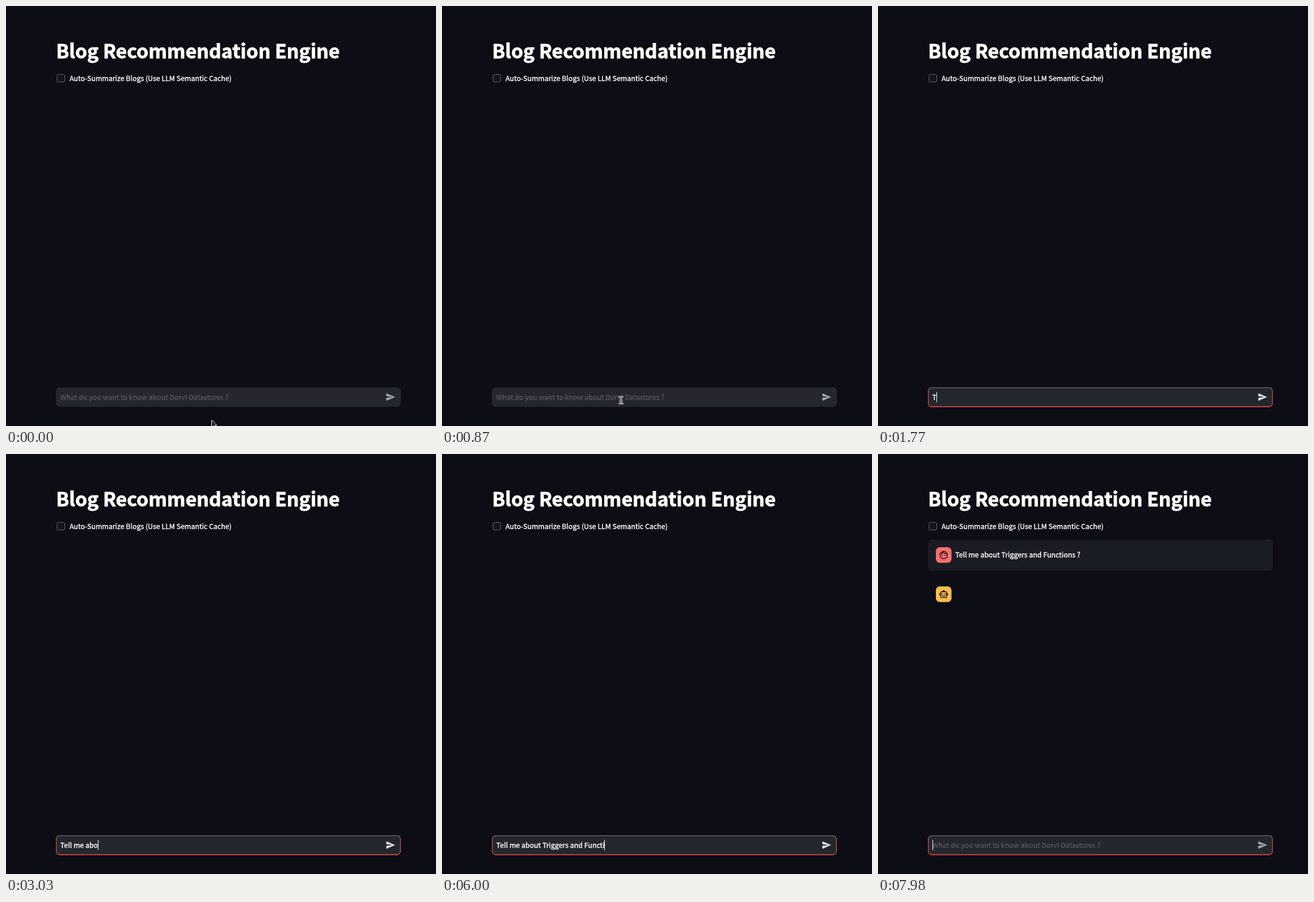
These frames come from a looping animation (758 by 739 pixels, 8 s). An HTML page:

```html
<!DOCTYPE html>
<html lang="en">
<head>
<meta charset="utf-8">
<title>Blog Recommendation Engine</title>
<style>
  html, body { margin: 0; width: 100%; height: 100%; overflow: hidden; background: #0c0d15; }
  svg { display: block; width: 100%; height: 100%; }
  text {
    font: 400 12.36px "Noto Sans CJK SC", "Noto Sans CJK JP", "Noto Sans", sans-serif;
    fill: #fafafa; stroke: #fafafa; stroke-width: .42px; white-space: pre;
  }
  #title { font-size: 33.85px; font-weight: 700; letter-spacing: 0; fill: #fff; stroke: #fff; stroke-width: .9px; }
  #hint { fill: #595b64; stroke: #595b64; stroke-width: .25px; }
</style>
</head>
<body>
<svg viewBox="0 0 758 739" xmlns="http://www.w3.org/2000/svg">
  <defs>
    <linearGradient id="ring" x1="0" y1="0" x2="0" y2="1">
      <stop offset="0" stop-color="#80757b"/>
      <stop offset=".05" stop-color="#80757b"/>
      <stop offset=".22" stop-color="#d94b47"/>
      <stop offset="1" stop-color="#e84c48"/>
    </linearGradient>
  </defs>
  <rect width="758" height="739" fill="#0c0d15"/>
  <rect y="737.5" width="758" height="1.5" fill="#07060c"/>

  <text id="title" x="88.2" y="92">Blog Recommendation Engine</text>
  <rect x="90" y="120.3" width="13.4" height="13.4" rx="2.5" fill="#12141b" stroke="#686a72"/>
  <text x="112" y="132">Auto-Summarize Blogs (Use LLM Semantic Cache)</text>

  <g id="question">
    <rect x="88" y="150.5" width="608" height="55" rx="7" fill="#1a1c23"/>
    <rect x="102" y="164" width="27.6" height="27.6" rx="7" fill="#fc6e6b"/>
    <g transform="translate(107.2 169.2) scale(.72)" fill="none" stroke="#14131a" stroke-width="2">
      <circle cx="12" cy="12" r="9"/>
      <path d="M3.5 11Q8.5 9 10.3 4Q13.5 9 20.4 9"/>
      <g fill="#14131a" stroke="none">
        <circle cx="9" cy="13" r="1.3"/><circle cx="15" cy="13" r="1.3"/>
      </g>
    </g>
    <text id="asked" x="136.3" y="182"></text>
  </g>

  <g id="answer">
    <rect x="102" y="233" width="27.6" height="27.6" rx="7" fill="#fbbc4c"/>
    <g transform="translate(107.2 238.2) scale(.72)" fill="#14131a">
      <path fill-rule="evenodd" d="M20 9V7c0-1.1-.9-2-2-2h-3c0-1.66-1.34-3-3-3S9 3.34 9 5H6c-1.1 0-2 .9-2 2v2c-1.66 0-3 1.34-3 3s1.34 3 3 3v4c0 1.1.9 2 2 2h12c1.1 0 2-.9 2-2v-4c1.66 0 3-1.34 3-3s-1.34-3-3-3zM18 19H6V7h12z"/>
      <circle cx="9" cy="11.5" r="1.5"/><circle cx="15" cy="11.5" r="1.5"/>
      <path d="M8 15h8v2H8z"/>
    </g>
  </g>

  <rect x="88" y="671" width="608" height="34.2" rx="7" fill="#25272e"/>
  <g id="focus" fill="none">
    <rect x="88.6" y="671.5" width="606.8" height="33.5" rx="6.5" stroke="url(#ring)" stroke-width="1.2"/>
    <path d="M92 704.6Q93.5 705.2 95 705.2H689Q690.5 705.2 692 704.6" stroke="#e84c48"/>
  </g>
  <text id="hint" x="95.8" y="693">What do you want to know about Dorvi Datastores ?</text>
  <text id="typed" x="95.8" y="693"></text>
  <rect id="caret" y="679" width="1" height="18" fill="#fff"/>
  <path id="send" transform="translate(669 679.2) scale(.74)" d="M2 21L23 12 2 3V10l15 2-15 2z"/>

  <path id="arrow" d="M0 0V12.5L3 9.7L5 14L7 13.2L5.1 9H9Z" fill="#0a0a0e" stroke="#fff" stroke-width="1" stroke-linejoin="round"/>
  <g id="beam" fill="none" stroke-linecap="round">
    <path id="beamShape" d="M-3 -6Q0 -6 0 -3.8Q0 -6 3 -6M0 -4V4M-3 6Q0 6 0 3.8Q0 6 3 6M-1.7 2H1.7" stroke="#fff" stroke-width="2.6"/>
    <path d="M-3 -6Q0 -6 0 -3.8Q0 -6 3 -6M0 -4V4M-3 6Q0 6 0 3.8Q0 6 3 6M-1.7 2H1.7" stroke="#101014" stroke-width=".9"/>
  </g>
</svg>
<script>
const LOOP = 8000, CLICK = 930, SEND = 7020, FIELD_BOTTOM = 704;
const MESSAGE = "Tell me about Triggers and Functions ?";
const KEYS = [
  1770, 1890, 2010, 2160, 2340, 2490, 2550, 2640, 2790, 2850,
  3030, 3090, 3180, 3300, 3690, 4020, 4140, 4260, 4380, 4530, 4590,
  4740, 4830, 4950, 5070, 5130, 5190, 5430, 5520, 5640, 5730,
  5940, 6000, 6030, 6180, 6240, 6690, 6900
];
// Pointer stops: time, x, y
const POINTER = [
  [0, 362.5, 728.8], [240, 341, 698], [390, 341, 698],
  [600, 329, 703], [870, 315.5, 693.5]
];

const $ = id => document.getElementById(id);
const show = (id, on) => $(id).setAttribute("visibility", on ? "visible" : "hidden");
const clamp = v => Math.max(0, Math.min(1, v));
const ease = v => v * v * (3 - 2 * v);

function pointerAt(t) {
  const i = POINTER.findIndex(p => p[0] > t);
  if (i < 0) return POINTER[POINTER.length - 1].slice(1);
  const [t0, x0, y0] = POINTER[i - 1], [t1, x1, y1] = POINTER[i];
  const k = ease((t - t0) / (t1 - t0));
  return [x0 + (x1 - x0) * k, y0 + (y1 - y0) * k];
}

function caretOn(t) {
  if (t < CLICK) return false;
  if (t < KEYS[0]) return t < 1440;
  return t < 7350 || t >= 7850;
}

function draw(time) {
  const t = Math.floor((time % LOOP) / 30) * 30;
  const count = t < SEND ? KEYS.filter(k => k <= t).length : 0;
  const typed = $("typed");
  typed.textContent = MESSAGE.slice(0, count);
  show("hint", !count);

  $("focus").setAttribute("opacity", clamp((t - CLICK) / 200));
  $("caret").setAttribute("x", count ? Math.round(95.3 + typed.getComputedTextLength()) : 96);
  show("caret", caretOn(t));
  $("send").setAttribute("fill", count ? "#e2e4ea" : "#a3a8b5");

  const [x, y] = pointerAt(t);
  const inField = y < FIELD_BOTTOM;
  for (const id of ["arrow", "beam"]) $(id).setAttribute("transform", `translate(${x} ${y})`);
  show("arrow", !inField);
  show("beam", inField && t < KEYS[0]);

  show("question", t >= 7680);
  show("answer", t >= 7770);
}

$("asked").textContent = MESSAGE;
const start = performance.now();
function tick() {
  draw(performance.now() - start);
  requestAnimationFrame(tick);
}
tick();
</script>
</body>
</html>
```
